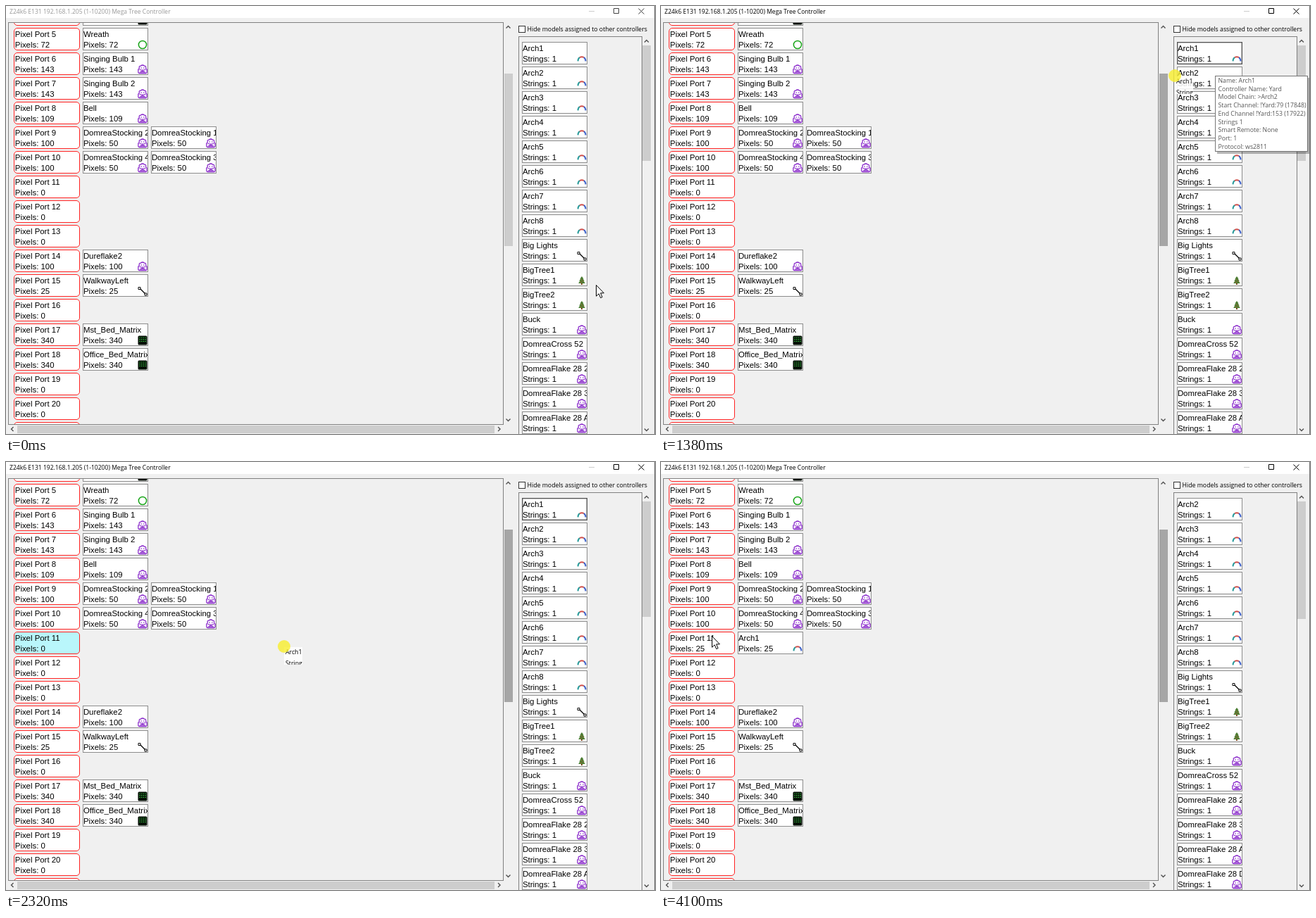
Write an HTML page that moves like this. It is 922x608 px and loops after 5340 ms.

```html
<!DOCTYPE html>
<html lang="en">
<head>
<meta charset="utf-8">
<title>Controller ports</title>
<style>
  html, body { margin: 0; width: 100%; height: 100%; overflow: hidden; background: #f0f0f0; }
  #stage { display: block; width: 100vw; height: 100vh; }
  .card { font: 11.4px "Liberation Sans", Arial, sans-serif; }
  .ui { font: 8.75px "Open Sans", "Noto Sans", sans-serif; }
  .port rect { fill: #fff; stroke: #f22; }
  .port.over rect { fill: #b9f6fb; }
  .model rect.box { fill: #fff; stroke: #8c8c8c; }
  .model.over rect.box { stroke: #555; stroke-width: 1.7; }
  .frame, .chevron { fill: none; stroke: #808080; }
  .chevron { stroke: #505050; stroke-width: 1.4; }
  .thumb { fill: #cdcdcd; }
</style>
</head>
<body>
<svg id="stage" viewBox="0 0 922 608" preserveAspectRatio="none"></svg>
<script>
const LOOP = 5340, ROW = 35, LIST_TOP = 51, PRESS = 1300, RELEASE = 3720, DROP = 4100;

// time, x, y of the pointer; each position is held until the next
const PATH = [
  [0, 838, 396], [70, 841, 381], [150, 845, 345], [220, 842, 300], [300, 836, 250],
  [370, 828, 200], [450, 818, 150], [520, 810, 118],
  [610, 791, 92], [690, 789, 86], [760, 788, 81], [840, 787, 80],
  [1300, 770, 85], [1380, 730, 99], [1460, 690, 113], [1530, 645, 130], [1610, 603, 155], [1690, 558, 180],
  [1770, 522, 198], [1850, 514, 205], [1920, 508, 211],
  [2240, 470, 232], [2320, 395, 262], [2400, 333, 279], [2470, 262, 283], [2550, 205, 278],
  [2620, 158, 271], [2710, 116, 265],
  [2790, 98, 260], [2870, 88, 256], [2940, 80, 252], [3020, 76, 250], [3090, 73, 248], [3170, 72, 247]
];

const dots = () => {
  let d = '';
  for (let y = -4; y <= 4; y += 2.7) for (let x = -4.6; x <= 4; x += 2.7) d += `M${x} ${y}h1.3`;
  return d;
};
const ICONS = {
  ring: '<circle r="5.6" fill="none" stroke="#14a314" stroke-width="1.5"/>',
  custom: `<g fill="none" stroke="#8420c8" stroke-width="1.2">
    <path d="M-4.5 5.6H4.5Q6.8 5 6 2Q6.8 -.5 4.6 -1.3Q5.6 -4.8 2.6 -4.8Q0 -7.2 -2.6 -4.8Q-5.6 -4.8 -4.6 -1.3Q-6.8 -.5 -6 2Q-6.8 5 -4.5 5.6Z"/>
    <path d="M-2.8 -2h1.8M1 -2h1.8M-4.4 .2Q0 2 4.4 .2M-3.4 4Q0 1.2 3.4 4Z"/></g>`,
  line: `<path d="M-4 -4L4 4" stroke="#000" stroke-width="1.2"/>
    <path d="M-6 -5.5h3v3h-3zM3 3h3v3h-3z" fill="#fff" stroke="#000"/>`,
  matrix: `<rect x="-6.5" y="-6.5" width="13" height="13" rx="1.5" fill="#061006"/>
    <path d="${dots()}" stroke="#3fd14b" stroke-width="1.2"/>`,
  arch: `<g fill="none" stroke-width="2"><path d="M-5.5 3.4Q-5.4 -.2-3 -1.8" stroke="#2b9c9c"/>
    <path d="M-3 -1.8Q0 -3.6 3 -1.8" stroke="#d0524d"/><path d="M3 -1.8Q5.4 -.2 5.5 3.4" stroke="#3f62c8"/></g>`,
  tree: `<path d="M-1 3h2v3h-2z" fill="#7a4a20"/>
    <path d="M0 -6L2.6 -2.4H1.6L3.8 .6H2.6L4.8 4H-4.8L-2.6 .6H-3.8L-1.6 -2.4H-2.6Z" fill="#4b7d32"/>
    <path d="M-1 -1h1.2M1 1h1.2M-2 2.4h1.2" stroke="#d2553a" stroke-width="1.2"/>`
};

const lines = (x, a, b) => `<text x="${x}" y="13">${a}</text><text class="count" x="${x}" y="28.2">${b}</text>`;
const portY = n => 31 + ROW * (n - 5);
const port = (n, pixels) => `<svg class="card port" id="port${n}" x="11" y="${portY(n)}" width="95" height="33">
  <rect x=".5" y=".5" width="93" height="31" rx="4.5"/>${lines(1.8, 'Pixel Port ' + n, 'Pixels: ' + pixels)}</svg>`;
const model = (x, y, name, info, icon, id = '') => `<svg class="card model" id="${id}" x="${x}" y="${y}" width="93" height="32">
  <rect class="box" x=".5" y=".5" width="92" height="31"/>
  <svg width="92" height="32">${lines(.9, name, info)}</svg>
  <g transform="translate(85 24)">${ICONS[icon]}</g></svg>`;

const PORTS = {
  4: [340, 'Matrix', 'matrix'], 5: [72, 'Wreath', 'ring'], 6: [143, 'Singing Bulb 1', 'custom'],
  7: [143, 'Singing Bulb 2', 'custom'], 8: [109, 'Bell', 'custom'],
  9: [100, 'DomreaStocking 2', 'custom', 'DomreaStocking 1'],
  10: [100, 'DomreaStocking 4', 'custom', 'DomreaStocking 3'],
  14: [100, 'Dureflake2', 'custom'], 15: [25, 'WalkwayLeft', 'line'],
  17: [340, 'Mst_Bed_Matrix', 'matrix'], 18: [340, 'Office_Bed_Matrix', 'matrix']
};
let ports = '';
for (let n = 4; n <= 21; n++) {
  const [pixels, first, icon, second] = PORTS[n] || [0];
  const info = 'Pixels: ' + (second ? pixels / 2 : pixels);
  ports += port(n, pixels);
  if (first) ports += model(109, portY(n), first, info, icon);
  if (second) ports += model(206, portY(n), second, info, icon);
}
ports += model(109, portY(11), 'Arch1', 'Pixels: 25', 'arch', 'dropped');

const MODELS = [
  ...Array.from({ length: 8 }, (_, i) => ['Arch' + (i + 1), 'arch']),
  ['Big Lights', 'line'], ['BigTree1', 'tree'], ['BigTree2', 'tree'], ['Buck', 'custom'],
  ['DomreaCross 52', 'custom'],
  ...['2', '3', 'A', 'D'].map(s => ['DomreaFlake 28 ' + s, 'custom'])
];
const list = MODELS.map(([name, icon], i) => model(733, LIST_TOP + ROW * i, name, 'Strings: 1', icon, 'model' + i)).join('');

const tooltip = (id, x, y, name, chain, start, end) => {
  const text = ['Name: ' + name, 'Controller Name: Yard', 'Model Chain: ' + chain, 'Start Channel: !Yard:' + start,
    'End Channel !Yard:' + end, 'Strings 1', 'Smart Remote: None', 'Port: 1', 'Protocol: ws2811'];
  return `<g id="${id}" class="ui" transform="translate(${x} ${y})" fill="#575757">
    <rect x="3" y="3" width="131" height="108" fill="#000" opacity=".28"/>
    <rect x=".5" y=".5" width="131" height="107" fill="#fff" stroke="#767676"/>
    ${text.map((s, i) => `<text x="4.5" y="${10 + i * 11.7}">${s.replace('>', '&gt;')}</text>`).join('')}</g>`;
};
const chevron = (x, y, turn) => `<path class="chevron" d="M-3 1.5L0 -1.5L3 1.5" transform="translate(${x} ${y}) rotate(${turn})"/>`;

document.getElementById('stage').innerHTML = `
  <rect width="922" height="608" fill="#f0f0f0"/>
  <rect width="922" height="17" fill="#fff"/>
  <text id="title" class="ui" x="5" y="10.7" style="font-size:8.55px">Z24k6 E131 192.168.1.205 (1-10200) Mega Tree Controller</text>
  <path d="M828 7.5h8" stroke="#ccc"/>
  <path id="buttons" d="M863.5 3.5h7v7h-7zM898.5 3.5l8 8M906.5 3.5l-8 8" fill="none"/>
  <rect class="frame" x="3.5" y="23.5" width="703" height="571"/>
  <svg x="4" y="24" width="702" height="570" viewBox="4 24 702 570">${ports}</svg>
  <rect id="thumb" x="708" y="96" width="12" height="245"/>
  <rect class="thumb" x="16" y="596" width="678" height="11"/>
  ${chevron(713.5, 30, 0)}${chevron(713.5, 588, 180)}${chevron(9, 601, -90)}${chevron(700.5, 601, 90)}
  <rect x="728.5" y="28.5" width="9" height="9" fill="#fff" stroke="#333"/>
  <text class="ui" x="740.5" y="36.2">Hide models assigned to other controllers</text>
  <rect class="frame" x="728.5" y="43.5" width="175" height="570"/>
  <g id="list">${list}</g>
  <rect id="listThumb" class="thumb" x="904" y="56" width="12"/>
  ${chevron(910, 50, 0)}${chevron(910, 602, 180)}
  <path d="M921.5 0V608" stroke="#777"/>
  ${tooltip('tip2', 810, 136, 'Arch2', 'Beginning', '4 (17773)', '78 (17847)')}
  ${tooltip('tip1', 787, 99, 'Arch1', '>Arch2', '79 (17848)', '153 (17922)')}
  <g id="drag">
    <svg id="ghost" class="ui" y="1" width="26" height="25">
      <rect width="26" height="25" fill="#fff" opacity=".85"/>
      <text x="2" y="10">Arch1</text><text x="2" y="25.5">Strings: 1</text>
    </svg>
    <circle r="9" fill="#f7ee2c" opacity=".8"/>
  </g>
  <path id="cursor" d="M.5 .5V16.2L4.2 12.8L6.7 18.6L9.1 17.5L6.6 11.8H11.4Z" fill="#fff" stroke="#000"/>`;

const $ = id => document.getElementById(id);
const show = (id, on) => $(id).style.display = on ? '' : 'none';
const move = (id, x, y) => $(id).setAttribute('transform', `translate(${x} ${y})`);

function hovered(t, x, y) {
  if (t >= DROP) return -1;
  if (t >= PRESS) return 0;
  const row = Math.floor((y - LIST_TOP) / ROW);
  return x > 733 && x < 826 && y - LIST_TOP - row * ROW < 32 ? row : -1;
}

function draw(t) {
  const [, x, y] = PATH.findLast(step => step[0] <= t);
  const active = t >= PRESS, dropped = t >= DROP, dragging = active && t < RELEASE;

  $('title').style.fill = active ? '#000' : '#999';
  $('buttons').style.stroke = active ? '#000' : '#444';
  $('thumb').style.fill = active ? '#a6a6a6' : '#cdcdcd';

  const target = active && !dropped && x < 707 ? 5 + Math.floor((y - 30) / ROW) : 0;
  for (let n = 4; n <= 21; n++) $('port' + n).classList.toggle('over', n === target);
  const over = hovered(t, x, y);
  MODELS.forEach((_, i) => $('model' + i).classList.toggle('over', i === over));

  show('tip2', t >= 610 && t < 760);
  show('tip1', t >= 1220 && t < 1770);
  show('drag', dragging);
  show('ghost', t >= 1380);
  show('cursor', !dragging);
  move('drag', x, y);
  move('cursor', x, y);

  show('dropped', dropped);
  show('model0', !dropped);
  move('list', 0, dropped ? -ROW : 0);
  $('listThumb').setAttribute('height', dropped ? 167 : 164);
  $('port11').querySelector('.count').textContent = 'Pixels: ' + (dropped ? 25 : 0);
}

const begin = performance.now();
function tick() {
  draw((performance.now() - begin) % LOOP);
  requestAnimationFrame(tick);
}
tick();
</script>
</body>
</html>
```
